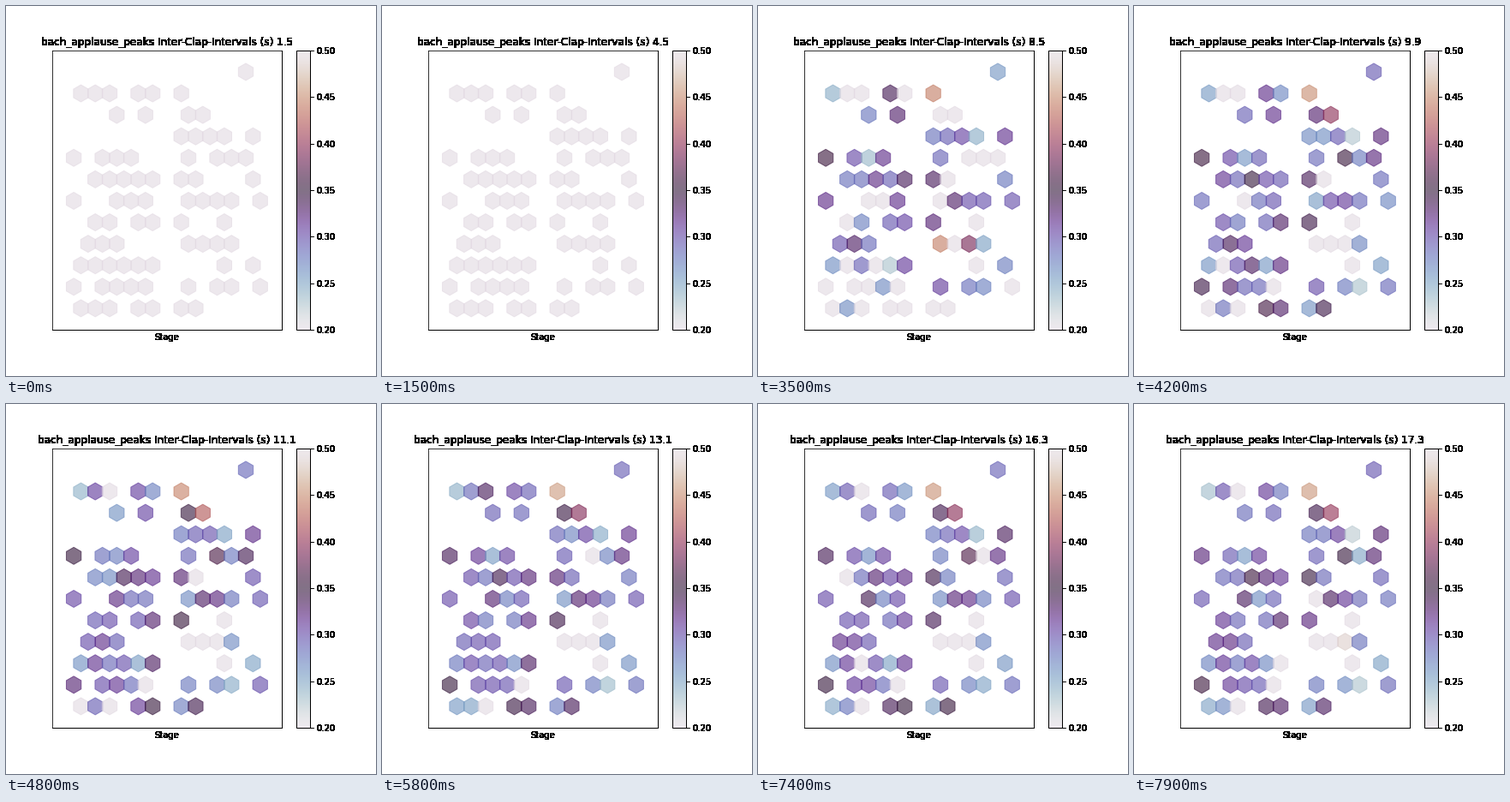
A matplotlib script for the animation above (8 s loop, 432 by 432 pixels).

```python
import numpy as np
import matplotlib.pyplot as plt
from matplotlib.animation import FuncAnimation

FRAMES, INTERVAL = 80, 100
T0, STEP = 1.5, 0.2
LOW, HIGH = 0.20, 0.50

# Blocks of neighbouring seats (first column, count), front row first;
# every second row is shifted by half a seat
BLOCKS = [
    [(2, 3), (6, 2), (9, 2)],
    [(1, 1), (3, 4), (9, 1), (11, 2), (14, 1)],
    [(2, 6), (12, 1), (14, 1)],
    [(2, 3), (9, 4)],
    [(3, 2), (6, 2), (9, 1), (12, 1)],
    [(1, 1), (4, 3), (9, 4), (14, 1)],
    [(3, 5), (9, 2), (14, 1)],
    [(1, 1), (3, 3), (9, 1), (11, 3)],
    [(9, 4), (14, 1)],
    [(4, 1), (6, 1), (9, 2)],
    [(2, 3), (6, 2), (9, 1)],
    [(13, 1)],
]

rng = np.random.default_rng(8)
times = T0 + STEP * np.arange(FRAMES)


def start_time(x, row):
    """The right side starts clapping first, the front row and some others late."""
    first = 7.05 if x < 6.5 or row == 1 else 5.25
    if rng.random() < (0.7 if row == 1 else 0.35):
        return 8.6 + rng.exponential(0.8)
    return first + (8.4 - first) * np.sqrt(rng.random())


def pick_pace():
    """Typical clap interval: mostly near 0.3 s, some slow or silent."""
    kind = rng.random()
    if kind < 0.12:
        return LOW
    if kind < 0.18:
        return rng.uniform(0.38, 0.48)
    return np.clip(rng.normal(0.295, 0.025), 0.24, 0.36)


def clap_track(x, row):
    """Latest inter-clap interval of one seat at every frame."""
    track = np.full(FRAMES, LOW)
    pace, t = pick_pace(), start_time(x, row)
    while t < times[-1]:
        spread = 0.008 + 0.03 * np.exp((5 - t) / 2.5)
        if pace <= LOW:
            gap = rng.uniform(0.24, 0.49) if rng.random() < 0.07 else LOW
        else:
            gap = LOW if rng.random() < 0.03 else rng.normal(pace, spread)
        track[times >= t] = gap
        t += max(gap, 0.23)
    return track


def harden(img, dpi):
    """Turn every touched pixel fully opaque."""
    img = img.copy()
    img[..., 3] = img[..., 3] > 0
    return img, 0, 0


seats = [(first + k + 0.5 * (row % 2 == 0), row)
         for row, blocks in enumerate(BLOCKS, 1)
         for first, count in blocks for k in range(count)]
gaps = np.array([clap_track(*seat) for seat in seats])
xs, ys = np.array(seats).T

plt.rcParams.update({"font.family": "DejaVu Sans", "font.size": 10})
fig = plt.figure(figsize=(6, 6), dpi=72, facecolor="white")
fig.subplots_adjust(left=0.125, right=0.9, bottom=0.125, top=0.88)
ax = fig.add_subplot()
dots = ax.scatter(xs, ys, c=gaps[:, 0], s=400, marker="h", alpha=0.6,
                  cmap="twilight", vmin=LOW, vmax=HIGH)
ax.set(xlim=(0, 16), ylim=(0, 13), xticks=[], yticks=[])
ax.spines[["right", "bottom"]].set_linewidth(1)
label = ax.set_xlabel("Stage")
title = ax.set_title("", fontsize=12)
bar = fig.colorbar(dots, ax=ax, ticks=np.linspace(LOW, HIGH, 7), format="%.2f")
bar.outline.set_linewidth(1)
for part in [label, title, *bar.ax.get_yticklabels(), *bar.ax.get_yticklines()]:
    part.set_agg_filter(harden)


def draw(i):
    dots.set_array(gaps[:, i])
    title.set_text(f"bach_applause_peaks Inter-Clap-Intervals (s) {times[i]:.1f}")
    return dots, title


anim = FuncAnimation(fig, draw, frames=FRAMES, interval=INTERVAL,
                     repeat=True, repeat_delay=0, blit=False)
plt.show()
```
